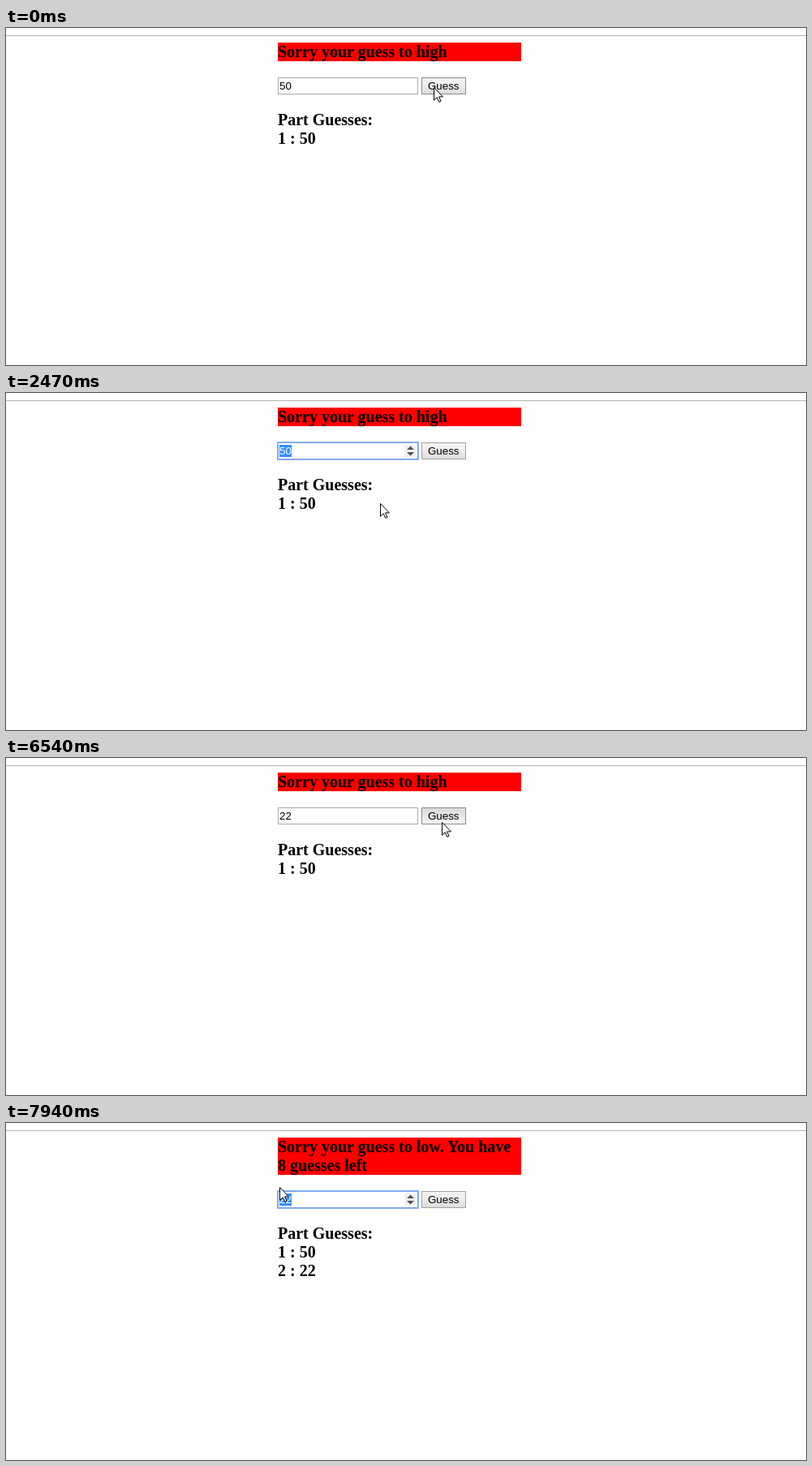
Animation, 986 px wide and 416 px high, one loop 8 s. Source, as an HTML page:

```html
<!DOCTYPE html>
<html lang="en">
<head>
<meta charset="utf-8">
<title>Number guessing game</title>
<style>
  html, body { margin: 0; width: 100%; height: 100%; overflow: hidden; background: #fefefe; }
  svg { display: block; width: 986px; height: 416px; }
  .big { font: bold 20px "Liberation Serif", "Times New Roman", serif; }
  .ui { font: 13.333px "Liberation Sans", Arial, sans-serif; }
  rect { shape-rendering: crispEdges; }
</style>
</head>
<body>
<svg viewBox="0 0 986 416">
  <defs>
    <linearGradient id="idle" x2="0" y2="1">
      <stop offset="0.3" stop-color="#f2f2f2"/><stop offset="1" stop-color="#dcdcdc"/>
    </linearGradient>
    <linearGradient id="down" x2="0" y2="1">
      <stop offset="0" stop-color="#dadada"/><stop offset="1" stop-color="#f4f4f4"/>
    </linearGradient>
  </defs>
  <rect width="986" height="416" fill="#fefefe"/>
  <rect y="9" width="986" height="1" fill="#b2b2b2"/>

  <rect id="banner" x="335" y="18" width="300" height="23" fill="#f00"/>
  <text id="msg1" class="big" x="335" y="36"></text>
  <text id="msg2" class="big" x="335" y="59">8 guesses left</text>

  <g id="form">
    <rect id="ring" x="334.5" y="60.5" width="174" height="22" rx="1" fill="none" stroke="#8db3f0"/>
    <rect id="box" x="335.5" y="61.5" width="172" height="20" fill="#fff"/>
    <rect id="mark" y="64" height="15" fill="#3390ff"/>
    <text class="ui" x="337" y="76"><tspan id="plain"></tspan><tspan id="picked" fill="#fff"></tspan></text>
    <rect id="caret" x="352" y="64" width="1" height="15"/>
    <g id="spin">
      <rect x="491" y="64" width="14" height="15" fill="#f0f0f0"/>
      <path d="M494 70h9l-4.5-4.5zM494 73h9l-4.5 4.5z" fill="#4f4f4f"/>
    </g>
    <rect id="button" x="512.5" y="61.5" width="54" height="20" rx="1"/>
    <text class="ui" x="520" y="76">Guess</text>
    <text class="big" x="335" y="120">Part Guesses:</text>
    <text class="big" x="335" y="143">1 : 50</text>
    <text id="second" class="big" x="335" y="166">2 : 22</text>
  </g>

  <path id="arrow" d="M.5 .5V16.3L4.2 12.8 6.8 18.4 9 17.5 6.6 11.9H11.4Z" fill="#fff" stroke="#000"/>
  <path id="beam" d="M0 .5h3M4 .5h3M3.5 1v14M0 15.5h3M4 15.5h3" fill="none" stroke="#000" shape-rendering="crispEdges"/>
</svg>
<script>
const LOOP = 8000, DIGIT = 7.415;
const el = {};
document.querySelectorAll('svg [id]').forEach(n => el[n.id] = n);

// from: index of the first selected digit (2 = nothing selected)
const start = { value: '50', from: 2, focus: 0, spin: 0, caret: 0, button: 'hover', low: 0 };

// time, pointer, x, y, what else changes
const steps = [
  [0, 'arrow', 527, 73],
  [150, 'beam', 397, 60, { spin: 1, button: 'idle' }],
  [300, 'beam', 395, 60],
  [450, 'beam', 390, 66],
  [580, 'beam', 384, 73],
  [720, 'beam', 378, 71, { focus: 1, caret: 1 }],
  [850, 'beam', 358, 65],
  [1000, 'beam', 344, 61, { from: 1, caret: 0 }],
  [1150, 'beam', 339, 60, { from: 0 }],
  [1280, 'beam', 336, 59],
  [1580, 'beam', 431, 101],
  [1710, 'arrow', 512, 171],
  [1860, 'arrow', 528, 201],
  [2010, 'arrow', 516, 178],
  [2170, 'arrow', 506, 166],
  [2320, 'arrow', 464, 138],
  [2470, 'arrow', 461, 136],
  [5270, 'arrow', 461, 136, { value: '22', from: 2, caret: 1 }],
  [5700, 'arrow', 430, 118, { caret: 0 }],
  [5830, 'arrow', 385, 94],
  [5980, 'beam', 387, 66],
  [6130, 'beam', 470, 73],
  [6260, 'arrow', 537, 79, { caret: 1, button: 'hover' }],
  [6410, 'arrow', 537, 79, { focus: 0, spin: 0, caret: 0 }],
  [6540, 'arrow', 537, 79, { button: 'down' }],
  [6660, 'arrow', 537, 79, { low: 1, button: 'idle' }],
  [6810, 'arrow', 526, 84],
  [6960, 'beam', 470, 80, { spin: 1 }],
  [7090, 'beam', 424, 82],
  [7240, 'beam', 415, 93],
  [7520, 'beam', 415, 94],
  [7660, 'beam', 405, 92, { focus: 1, caret: 1 }],
  [7790, 'beam', 353, 82],
  [7940, 'arrow', 337, 79, { from: 0, caret: 0 }]
];

let state = start;
const poses = steps.map(([time, pointer, x, y, change]) => {
  state = { ...state, ...change };
  return { ...state, time, pointer, x, y };
});

const set = (id, name, value) => el[id].setAttribute(name, value);
const show = (id, on) => set(id, 'visibility', on ? 'visible' : 'hidden');

function draw(p) {
  set('banner', 'height', p.low ? 46 : 23);
  el.msg1.textContent = p.low ? 'Sorry your guess to low. You have' : 'Sorry your guess to high';
  show('msg2', p.low);
  show('second', p.low);
  set('form', 'transform', `translate(0 ${p.low ? 23 : 0})`);

  show('ring', p.focus);
  set('box', 'stroke', p.focus ? '#7ba3e4' : '#a9a9a9');
  show('spin', p.spin);
  show('caret', p.caret);
  el.plain.textContent = p.value.slice(0, p.from);
  el.picked.textContent = p.value.slice(p.from);
  const left = Math.round(337 + p.from * DIGIT);
  set('mark', 'x', left);
  set('mark', 'width', 352 - left);

  set('button', 'fill', p.button === 'down' ? 'url(#down)' : 'url(#idle)');
  set('button', 'stroke', p.button === 'idle' ? '#a3a3a3' : '#8c8c8c');

  for (const id of ['arrow', 'beam']) show(id, id === p.pointer);
  set(p.pointer, 'transform', `translate(${p.x} ${p.y})`);
}

let last;
function tick() {
  const t = performance.now() % LOOP;
  const pose = poses.filter(p => p.time <= t).pop();
  if (pose !== last) draw(last = pose);
  requestAnimationFrame(tick);
}
tick();
</script>
</body>
</html>
```
